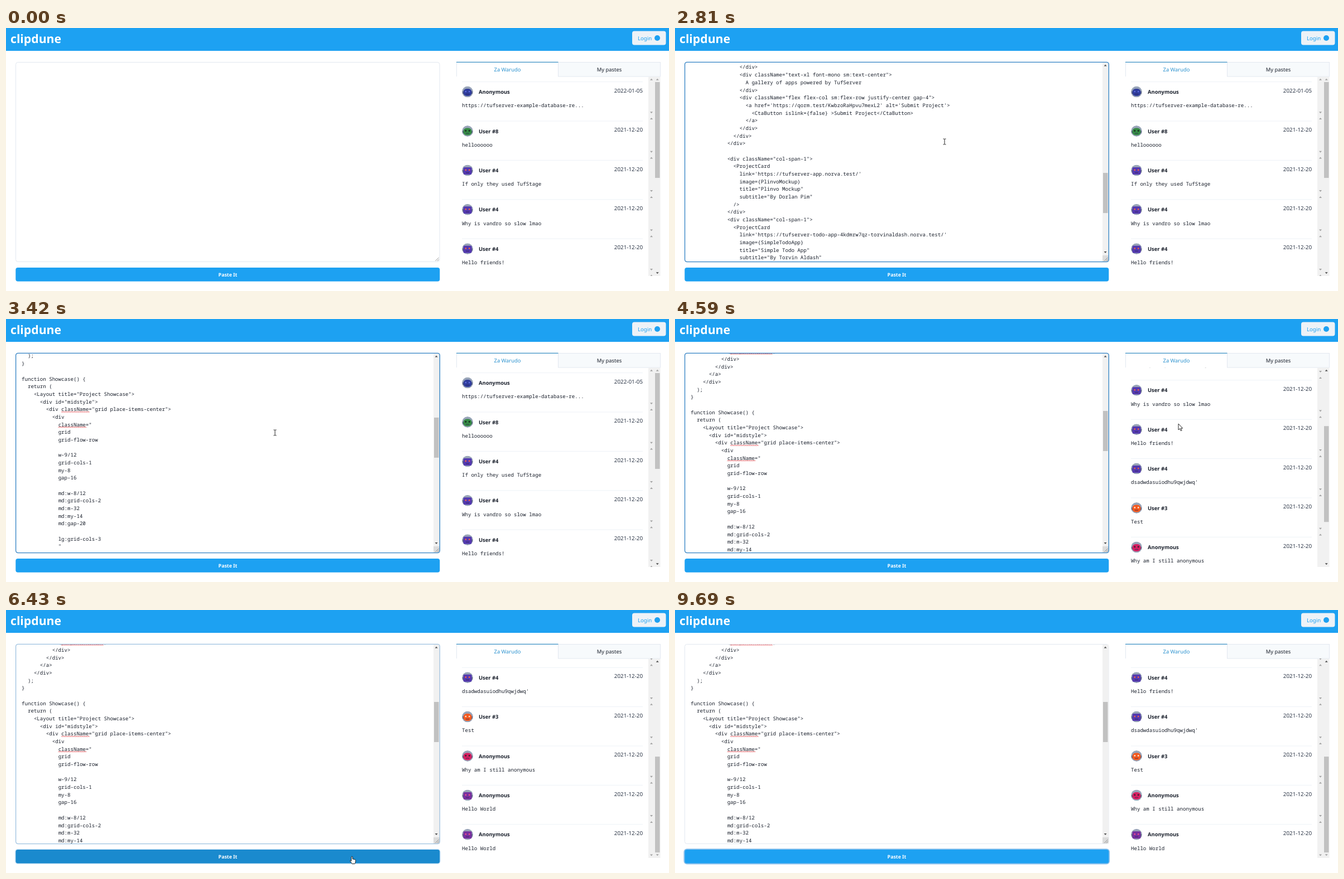
An HTML page that plays this animation: 1188 by 472 pixels, repeating every 9.76 s.

```html
<!DOCTYPE html>
<html lang="en">
<head>
<meta charset="utf-8">
<title>clipdune</title>
<style>
html, body { margin: 0; width: 100%; height: 100%; overflow: hidden; background: #fff; }
svg { display: block; text-rendering: geometricPrecision; font: 9.4px "Noto Sans", "Open Sans", sans-serif; fill: #1a202c; }
.mono { font: 9.12px "Noto Sans Mono", "DejaVu Sans Mono", monospace; }
.bold { font-weight: 700; }
.mid { text-anchor: middle; }
.end { text-anchor: end; }
</style>
</head>
<body>
<svg id="stage" width="1188" height="472" viewBox="0 0 1188 472">
  <defs>
    <clipPath id="codeClip"><rect x="18" y="62" width="748" height="357"/></clipPath>
    <clipPath id="listClip"><rect x="807" y="87" width="366" height="358"/></clipPath>
    <clipPath id="faceClip"><circle r="10"/></clipPath>
  </defs>

  <rect width="1188" height="41" fill="#1da1f2"/>
  <text x="8" y="27.2" class="bold" font-size="21.2" fill="#fff">clipdune</text>
  <rect x="1122" y="5.5" width="60.5" height="25" rx="4" fill="#edf2f7"/>
  <text x="1132" y="21.5" font-size="9.6" fill="#1da1f2">Login</text>
  <circle cx="1167" cy="18" r="5" fill="#1da1f2"/>

  <rect x="17.5" y="61.5" width="759.5" height="358" rx="4" fill="#fff" stroke="#e2e8f0"/>
  <g id="codeBar">
    <rect x="766" y="62" width="11" height="346" fill="#f1f1f1"/>
    <rect x="766" y="408" width="11" height="11" fill="#dcdcdc"/>
    <rect id="codeThumb" x="767" width="8.5" height="72" fill="#c1c1c1"/>
    <path d="M768.6 68.5h5l-2.500-3zM768.6 401h5l-2.500 3z" fill="#505050"/>
  </g>
  <path d="M769.5 418l6-6M773 418l2.700-2.700" stroke="#777" stroke-width=".8"/>
  <rect id="focusBorder" x="17.6" y="61.3" width="759.7" height="358.3" rx="4" fill="none" stroke="#2f80c4" stroke-width="1.3"/>
  <rect id="emptyCaret" x="28" y="64" width="1" height="13"/>
  <g clip-path="url(#codeClip)"><g id="code" class="mono"></g></g>

  <rect id="button" x="17.3" y="430" width="760" height="24.7" rx="4"/>
  <rect id="ring" x="16.5" y="429.2" width="761.6" height="26.3" rx="5" fill="none" stroke="#4299e1" stroke-opacity=".6" stroke-width="2"/>
  <text x="397.5" y="446.3" class="bold mid" font-size="8.8" fill="#fff">Paste It</text>

  <rect x="989.5" y="61.5" width="183" height="25.5" fill="#f7fafc" stroke="#e2e8f0"/>
  <path d="M807.5 62v25" stroke="#e2e8f0"/>
  <path d="M807 61.4h182.5" stroke="#3a8fc4" stroke-width="1.2"/>
  <text x="898.5" y="77.8" class="mid" fill="#2d93cf">Za Warudo</text>
  <text x="1081" y="77.8" class="mid">My pastes</text>
  <rect x="1151" y="87.5" width="21.5" height="357.5" fill="#f1f1f1"/>
  <g clip-path="url(#listClip)"><g id="list"></g></g>
  <rect id="listThumb" x="1163" width="8.5" height="172" fill="#c1c1c1"/>
  <path id="listUp" d="M1164.7 93.7h5l-2.500-3z"/>
  <path id="listDown" d="M1164.7 438.3h5l-2.500 3z"/>

  <g id="cursor">
    <path id="arrow" d="M0 0v11l2.500-2.300 1.800 4 1.800-.8-1.800-3.800h3.400z" fill="#fff" stroke="#111" stroke-width=".9"/>
    <path id="beam" d="M-2.500-5h2l.5.500.5-.5h2M0-4.500v9M-2.500 5h2l.5-.5.5.5h2" fill="none" stroke="#222"/>
    <path id="hand" d="M-1.200 1q1.200-2 2.200 0v3.800l4.200 1q1.400.4 1.300 2l-.6 3.700-1 2h-4.800l-3.300-4.700q-.5-1.600.8-1.400l1.200 1.200z" fill="#fff" stroke="#111" stroke-width=".9"/>
  </g>
</svg>

<script>
const LOOP = 9760, FRAME = 68;
const LINE = 13.68, CHAR = 5.47, ITEM = 70.4, MAX_SCROLL = 345.4;
const PASTED = 1670, POSTED = 7240;

const source = `            {props.subtitle}
          </div>
        </div>
      </a>
    </div>
  );
}

function Showcase() {
  return (
    <Layout title="Project Showcase">
      <div id="midstyle">
        <div className="grid place-items-center">
          <div
            className="
            grid
            grid-flow-row

            w-9/12
            grid-cols-1
            my-8
            gap-16

            md:w-8/12
            md:grid-cols-2
            md:m-32
            md:my-14
            md:gap-20

            lg:grid-cols-3
            "
          >
            <div className="col-span-1">
              <div className="grid gap-4">
                <div className="text-3xl font-bold">
                  Project Showcase
                </div>
                <div className="text-xl font-mono sm:text-center">
                  A gallery of apps powered by TufServer
                </div>
                <div className="flex flex-col sm:flex-row justify-center gap-4">
                  <a href='https://qorm.test/KwbzoRaHpvu7mexL2' alt='Submit Project'>
                    <CtaButton islink={false} >Submit Project</CtaButton>
                  </a>
                </div>
              </div>
            </div>

            <div className="col-span-1">
              <ProjectCard
                link='https://tufserver-app.norva.test/'
                image={PlinvoMockup}
                title="Plinvo Mockup"
                subtitle="By Dorlan Pim"
              />
            </div>
            <div className="col-span-1">
              <ProjectCard
                link='https://tufserver-todo-app-4kdmrw7qz-torvinaldash.norva.test/'
                image={SimpleTodoApp}
                title="Simple Todo App"
                subtitle="By Torvin Aldash"
              />
            </div>
            <div className="col-span-1">
              <ProjectCard
                link='https://tufstall.glimvo.test/'
                image={SimpleECommerce}
                title="Simple E-Commerce App"
                subtitle="By Lio Wen Qa"
              />
            </div>

          </div>
        </div>
        <br />
        <br />
        <br />
        <br />
      </div>
    </Layout>
  );
}

export default Showcase;
`.split("\n");

// row, column and length of the underlined words
const misspelt = [[0, 13, 14], [12, 13, 9], [14, 12, 9]];

const robots = {
  dome:   { color: "#2f3c9c", eye: "#5c6be0", round: true },
  green:  { color: "#358a45", eye: "#14281a", round: true },
  violet: { color: "#5439b0", eye: "#f2604c" },
  orange: { color: "#f4591f", eye: "#ffe0c8", round: true },
  pink:   { color: "#d61f62", eye: "#33202c", round: true },
  purple: { color: "#76309f", eye: "#f0508a" }
};

const pastes = [
  ["Anonymous", "https://tufserver-example-database-re...", "dome"],
  ["User #8", "helloooooo", "green"],
  ["User #4", "If only they used TufStage", "violet"],
  ["User #4", "Why is vandro so slow lmao", "violet"],
  ["User #4", "Hello friends!", "violet"],
  ["User #4", "dsadwdasuiodhu9qwjdwq'", "violet"],
  ["User #3", "Test", "orange"],
  ["Anonymous", "Why am I still anonymous", "pink"],
  ["Anonymous", "Hello World", "purple"],
  ["Anonymous", "Hello World", "purple"]
];

// [time, value...] steps, linear in between
const cursorPath = [
  [380, 1089, 462], [560, 760, 320], [700, 560, 235], [860, 481, 201],
  [2330, 481, 201], [2470, 483, 204], [3150, 483, 204], [3420, 482, 204],
  [3580, 482, 204], [3760, 660, 204], [3920, 850, 195], [4050, 898, 190],
  [4400, 898, 190], [4560, 902, 188], [5380, 902, 188], [5560, 850, 235],
  [5800, 690, 380], [5930, 640, 428], [6030, 620, 442], [7200, 620, 442],
  [7440, 622, 345], [7640, 780, 230], [7780, 882, 175], [7860, 920, 157],
  [8000, 988, 128], [8190, 994, 195], [8220, 994, 195], [8530, 1028, 267],
  [8750, 1028, 267], [9240, 1143, 464]
];
const codeTop = [[2340, -750.3], [2808, -422], [2940, -340], [3090, -340], [3420, -1.9], [3550, 58.2]];
const listScroll = [[4390, 0], [4576, 198], [4770, 260], [5060, 260], [5260, MAX_SCROLL]];
const focusLevel = [[1040, 0], [1300, 1], [6340, 1], [6460, 0]];
const ringLevel = [[6340, 0], [6580, 1]];
const hoverLevel = [[5930, 0], [6030, 1], [7240, 1], [7380, 0]];

function at(steps, t) {
  const next = steps.findIndex(step => step[0] > t);
  if (next === 0) return steps[0].slice(1);
  if (next < 0) return steps[steps.length - 1].slice(1);
  const a = steps[next - 1], b = steps[next];
  const k = (t - a[0]) / (b[0] - a[0]);
  return a.slice(1).map((v, i) => v + (b[i + 1] - v) * k);
}

const parts = {};
document.querySelectorAll("#stage [id]").forEach(el => { parts[el.id] = el; });

const set = (el, attrs) => {
  for (const name in attrs) el.setAttribute(name, attrs[name]);
  return el;
};
const add = (parent, tag, attrs, text = "") => {
  const el = set(document.createElementNS(parent.namespaceURI, tag), attrs);
  el.textContent = text;
  return parent.appendChild(el);
};
const show = (el, on) => { el.style.display = on ? "" : "none"; };
const move = (el, x, y) => set(el, { transform: `translate(${x} ${y})` });

function buildCode() {
  source.forEach((line, row) => {
    const text = line.trim();
    if (text) add(parts.code, "text", { x: 28 + line.indexOf(text) * CHAR, y: row * LINE + 3 }, text);
  });
  for (const [row, col, length] of misspelt) {
    const waves = "l1.4-1.3 1.4 1.3".repeat(Math.round(length * CHAR / 2.8));
    add(parts.code, "path", {
      d: `M${28 + col * CHAR} ${row * LINE + 5.2}${waves}`,
      fill: "none", stroke: "#e5393f", "stroke-width": 0.9
    });
  }
  parts.caret = add(parts.code, "rect", { x: 28, y: (source.length - 1) * LINE - 6.5, width: 1, height: 13 });
}

function buildRobot(parent, { color, eye, round }) {
  const face = add(parent, "g", { "clip-path": "url(#faceClip)" });
  add(face, "circle", { r: 10, fill: "#98a4b8" });
  add(face, "rect", { x: -9, y: -1, width: 18, height: 5, rx: 1.5, fill: "#626b86" });
  add(face, "rect", { x: -7.5, y: -5.5, width: 15, height: 13, rx: round ? 6 : 2, fill: color });
  for (const x of [-3.2, 3.2]) add(face, "circle", { cx: x, cy: -0.5, r: 1.4, fill: eye });
  add(face, "rect", { x: -3, y: 3.5, width: 6, height: 1.3, fill: "#2a2350", opacity: 0.6 });
}

function buildList() {
  pastes.forEach(([name, text, robot], i) => {
    const item = move(add(parts.list, "g", {}), 0, 87 + i * ITEM);
    add(item, "path", { d: "M817 9.6h324", stroke: "#edf2f7" });
    buildRobot(move(add(item, "g", {}), 827, 27.6), robots[robot]);
    add(item, "text", { x: 847, y: 31.3, class: "bold" }, name);
    add(item, "text", { x: 1141, y: 28.8, class: "end", "font-size": 9.8, fill: "#2d3748" }, i ? "2021-12-20" : "2022-01-05");
    add(item, "text", { x: 817, y: 55.4, class: "mono" }, text);
    add(item, "path", { d: "M1154 6.7h5l-2.500-3zM1154 63.3h5l-2.500 3z", fill: "#a3a3a3" });
  });
}

function drawCursor(t, frameTime) {
  const [x, y] = at(cursorPath, frameTime);
  const overText = x > 17 && x < 777 && y > 61 && y < 420;
  const overButton = x > 17 && x < 777 && y >= 430 && y < 455;
  show(parts.cursor, t >= 380 && t < 9280);
  show(parts.beam, overText);
  show(parts.hand, overButton);
  show(parts.arrow, !overText && !overButton);
  move(parts.cursor, x, y);
}

function render(t) {
  const frameTime = Math.floor((t - 20) / FRAME) * FRAME + 20;
  const pasted = t >= PASTED;
  const [top] = at(codeTop, frameTime);
  const [scroll] = at(listScroll, frameTime);
  const [hover] = at(hoverLevel, frameTime);

  show(parts.code, pasted);
  show(parts.codeBar, pasted);
  move(parts.code, 0, top);
  set(parts.codeThumb, { y: 165 + (58.2 - top) * 0.198 });
  show(parts.caret, t < 1800 || t >= 2200);
  show(parts.emptyCaret, t >= 1130 && !pasted);
  set(parts.focusBorder, { opacity: at(focusLevel, frameTime)[0] });

  set(parts.button, { fill: `rgb(${29 - 3 * hover},${161 - 23 * hover},${242 - 36 * hover})` });
  set(parts.ring, { opacity: at(ringLevel, frameTime)[0] });

  // a new paste pushes every item down by one place
  move(parts.list, 0, (t >= POSTED ? ITEM : 0) - scroll);
  set(parts.listThumb, { y: 97 + scroll * 0.481 });
  set(parts.listUp, { fill: scroll > 0 ? "#505050" : "#a3a3a3" });
  set(parts.listDown, { fill: scroll < MAX_SCROLL ? "#505050" : "#a3a3a3" });

  drawCursor(t, frameTime);
}

buildCode();
buildList();
const start = performance.now();
function tick() {
  render((performance.now() - start) % LOOP);
  requestAnimationFrame(tick);
}
tick();
</script>
</body>
</html>
```
